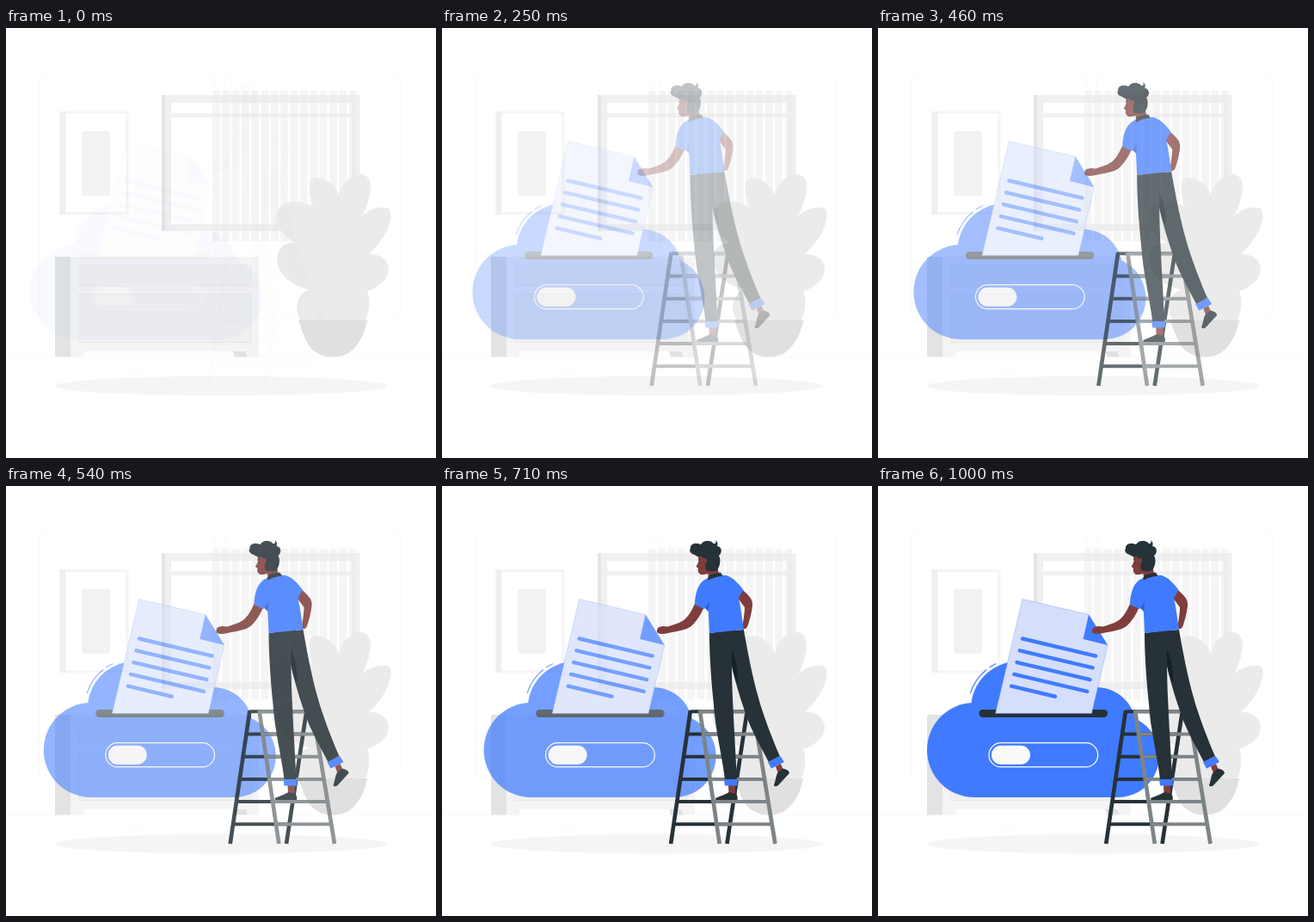
An HTML page with a canvas for the animation above (1.04 s loop, 500x500 px).

```html
<!DOCTYPE html>
<html lang="en">
<head>
<meta charset="utf-8">
<title>Cloud upload</title>
<style>
html, body { margin: 0; width: 100%; height: 100%; overflow: hidden; background: #fff; }
canvas { display: block; width: 500px; height: 500px; }
</style>
</head>
<body>
<canvas id="stage"></canvas>
<script>
const SIZE = 500, LOOP = 1040, SLIDE = 30;
const BLUE = '#407bff', DARK = '#263238', SKIN = '#7f3e3b', STEEL = '#7d8487';
const ratio = window.devicePixelRatio || 1;

function setup(canvas) {
  canvas.width = canvas.height = SIZE * ratio;
  return canvas.getContext('2d');
}

const stage = setup(document.getElementById('stage'));
const sheet = setup(document.createElement('canvas'));
const wall = setup(document.createElement('canvas'));
let c = wall;

function rect(x, y, x2, y2, fill) {
  c.fillStyle = fill;
  c.fillRect(x, y, x2 - x, y2 - y);
}

function round(x, y, x2, y2, r) {
  c.beginPath();
  c.roundRect(x, y, x2 - x, y2 - y, r);
}

function pill(x, y, x2, y2, r, fill) {
  round(x, y, x2, y2, r);
  c.fillStyle = fill;
  c.fill();
}

function frame(x, y, x2, y2, r, color, width) {
  round(x, y, x2, y2, r);
  c.strokeStyle = color;
  c.lineWidth = width;
  c.stroke();
}

function shape(d, fill) {
  c.fillStyle = fill;
  c.fill(new Path2D(d));
}

function line(d, color, width, cap = 'butt') {
  c.strokeStyle = color;
  c.lineWidth = width;
  c.lineCap = cap;
  c.stroke(new Path2D(d));
}

function disc(x, y, r, fill) {
  c.fillStyle = fill;
  c.beginPath();
  c.arc(x, y, r, 0, 7);
  c.fill();
}

function drawRoom() {
  rect(0, 0, SIZE, SIZE, '#fff');
  rect(0, 382.4, 500, 382.65, '#ebebeb');
  line('M137 398.4H160M57 401H96M255 390H294M302 390H350M392 399.5H448', '#ebebeb', 0.25);
  frame(38.4, 55.1, 242.6, 337.7, 5.7, '#ebebeb', 0.3);
  frame(254.7, 55.1, 458.7, 337.7, 5.7, '#ebebeb', 0.3);

  // picture
  rect(62.5, 97, 142.5, 217, '#f5f5f5');
  rect(62.5, 97, 69.5, 217, '#efefef');
  rect(69.5, 100, 139.5, 214, '#fff');
  pill(88, 120, 121, 195, 3, '#f2f2f2');

  // window and blinds
  rect(181, 78, 411.5, 236, '#f0f0f0');
  rect(181, 78, 185, 236, '#e4e4e4');
  rect(192, 87, 405, 228, '#ebebeb');
  rect(192, 87, 402, 228, '#fff');
  rect(192, 99, 405, 104, '#f2f2f2');
  for (let i = 0; i < 15; i++) {
    const x = 240 + i * 11.35;
    rect(x, 73, x + 8.5, 248, 'rgba(235,235,235,.5)');
  }

  // cabinet
  rect(57, 266, 75, 382.4, '#e2e3e2');
  rect(75, 266, 294, 376, '#f4f4f4');
  shape('M75 375H91.500L89 382.400H75Z', '#f4f4f4');
  shape('M264 376H280L282 382.400H266Z', '#e2e2e2');
  shape('M278 375H294V382.400H281Z', '#f4f4f4');
  for (const [y, y2] of [[276, 299.500], [309.500, 365.500]]) {
    rect(84.5, y, 285, y2, '#f0f0f0');
    frame(84.5, y, 285, y2, 0, '#e2e2e2', 0.6);
  }

  // plant
  shape('M343 341C334 326 338 309 353 304C331 300 315 285 315 268C315 256 325 249 335 250' +
    'C321 239 313 228 314 218C316 204 332 200 345 203Q353 205 358 209C353 197 351 183 354 177' +
    'C360 170 380 176 387 194C390 182 400 170 413 170C427 172 428 190 414 219' +
    'C424 209 440 206 446 211C451 220 444 242 422 263C437 262 446 272 445 282' +
    'C442 298 426 304 420 306C424 315 423 330 417 341Z', '#ebebeb');
  shape('M340 340H420.500C417 350 416 358 409 367C402 378 392 382.500 380 382.500' +
    'C367 382.500 357 377 351 367C346 358 343 349 340 340Z', '#e0e0e0');

  c.fillStyle = '#f5f5f5';
  c.beginPath();
  c.ellipse(250, 416.2, 193.9, 11.3, 0, 0, 7);
  c.fill();
}

function drawCloud() {
  disc(112, 307, 55, BLUE);
  disc(163, 259, 55, BLUE);
  disc(254, 280, 46, BLUE);
  disc(279, 314, 48, BLUE);
  rect(112, 262, 279, 362, BLUE);
  c.strokeStyle = BLUE;
  c.lineWidth = 1.2;
  for (const [a, b] of [[198, 231], [235, 244]]) {
    c.beginPath();
    c.arc(163, 259, 58.5, a * Math.PI / 180, b * Math.PI / 180);
    c.stroke();
  }

  pill(117.5, 260, 267, 269, 4.5, DARK);
  const page = 'M168 131.500L245 149.500L267 185L248.500 264.500H136.500Z';
  shape(page, '#d5dffb');
  line(page, BLUE, 0.3);
  shape('M245 149.500L238.500 178L267 185Z', BLUE);
  for (let i = 0; i < 5; i++) {
    const x = 168 - i * 3.25, y = 177.5 + i * 13.8;
    const run = i < 4 ? 85 : 51;
    line(`M${x} ${y}l${run} ${run * 0.236}`, BLUE, 4.4, 'round');
  }

  frame(129, 298.7, 255.7, 326.7, 14, '#fff', 1.2);
  pill(132, 301.7, 177, 323.7, 11, '#fafafa');
}

function ladder(x, x2, foot, foot2, color) {
  line(`M${x} 261L${foot} 416M${x2} 261L${foot2} 416`, color, 4.7);
  for (let y = 262.3; y < 400; y += 26.2) {
    const t = (y - 261) / 155;
    line(`M${x + (foot - x) * t} ${y}H${x2 + (foot2 - x2) * t}`, color, 4);
  }
}

function drawWorker() {
  ladder(288, 354, 265.2, 330.5, DARK);
  ladder(299, 361, 321.8, 386.5, STEEL);

  // feet
  shape('M332 347H340.500L340 358H332.500Z', SKIN);
  shape('M387 326L393 323L396.500 331L390 334Z', SKIN);
  shape('M317 363C323 361 329 358 333 356L341 358Q343.500 361 342.500 365H317.500Z', DARK);
  shape('M395 328.500C399 329 403 331 403 334L391 347C389 349.500 386 350 385 348C387 343 387 338 389 334Z', DARK);

  // trousers
  shape('M333 169L350 167C354 190 360 222 367 246C372 265 384 296 392 314L379 321' +
    'C370 304 359 284 354 270C347 250 339 226 334 200Z', DARK);
  shape('M310 171L341 167C341 178 336 188 336 200C336 238 338 258 339 285L342 341H328' +
    'C324 310 317 284 315 254C312 224 310 196 310 171Z', DARK);
  shape('M336 190C342 204 344 218 342.500 229C338 220 335 208 336 190Z', '#172024');
  shape('M327 341H343L342.500 348.500H328Z', BLUE);
  shape('M378 321L392.500 314L397 321L382 328.500Z', BLUE);

  // arms
  shape('M342 129L348 120C355 127 361 131 360 139C359 149 356 159 354 164' +
    'C352 167 349 167 348 164C350 155 351 146 351 141Z', SKIN);
  shape('M294 135C288 148 284 155 275 159L262 163.500L256 163C250 164 249 165 249 170' +
    'C252 173 257 172 262 171C275 168.500 286 167 291 161C296 156 301 148 303.500 141Z', SKIN);

  // shirt
  shape('M306 108C313 105 323 103 330 104C338 107 344 113 349.500 121L344 130' +
    'C347 143 348 155 350 167L310 171L308.500 139L304 143L293 138' +
    'C293 126 297 112 306 108Z', BLUE);
  shape('M310 130C310 135 308 138 305 142L309 146Z', '#2d5ccc');

  // head
  shape('M297 82L297.500 88L294.500 94L297 95.500C296 100 298 103.500 303 103L308.500 102' +
    'L309 108C315 108 320 105 321 101L318 90L310 78Z', SKIN);
  shape('M308 107L311 103L323 100.500L325.500 104.500C319 105 313 107 309 109.500Z', DARK);
  shape('M305 91C304 88 304 84 301 82C297 83 294 81 293 80C288 79 286 75 288 73' +
    'C287 68 293 65 300 68C303 63 311 62 315 67C318 67 318 65 317 63C320 65 320 68 319 70' +
    'C324 70 326 77 321 81C324 86 322 94 319 98C316 100 311 99.500 306 98Z', DARK);
  c.fillStyle = SKIN;
  c.beginPath();
  c.ellipse(304.5, 87.5, 2.4, 3.8, 0.2, 0, 7);
  c.fill();
  disc(298.8, 89, 0.8, DARK);
  line('M296.800 86L299.800 85', DARK, 0.8);
}

function bezier(a, b, s) {
  return 3 * (1 - s) * (1 - s) * s * a + 3 * (1 - s) * s * s * b + s * s * s;
}

// cubic-bezier(.36, -.01, .5, 1.38)
function overshoot(p) {
  let lo = 0, hi = 1;
  for (let i = 0; i < 24; i++) {
    const mid = (lo + hi) / 2;
    if (bezier(0.36, 0.5, mid) < p) lo = mid; else hi = mid;
  }
  return bezier(-0.01, 1.38, hi);
}

function slideIn(draw, e) {
  c = sheet;
  c.setTransform(1, 0, 0, 1, 0, 0);
  c.clearRect(0, 0, SIZE * ratio, SIZE * ratio);
  c.setTransform(ratio, 0, 0, ratio, SLIDE * (e - 1) * ratio, 0);
  draw();
  stage.globalAlpha = Math.max(0, Math.min(1, e));
  stage.drawImage(sheet.canvas, 0, 0);
  stage.globalAlpha = 1;
}

function progress(t) {
  const step = Math.floor((Math.floor(t / 10) * 10 + 4.9) * 0.024);
  return step < 2 ? 0.03 : Math.min(1, (step + 1) / 25);
}

function render(now) {
  const p = progress(now % LOOP);
  stage.drawImage(wall.canvas, 0, 0);
  slideIn(drawCloud, p);
  slideIn(drawWorker, overshoot(p));
}

wall.setTransform(ratio, 0, 0, ratio, 0, 0);
drawRoom();

let start;
function tick(now) {
  start ??= now;
  render(now - start);
  requestAnimationFrame(tick);
}
render(0);
requestAnimationFrame(tick);
</script>
</body>
</html>
```
